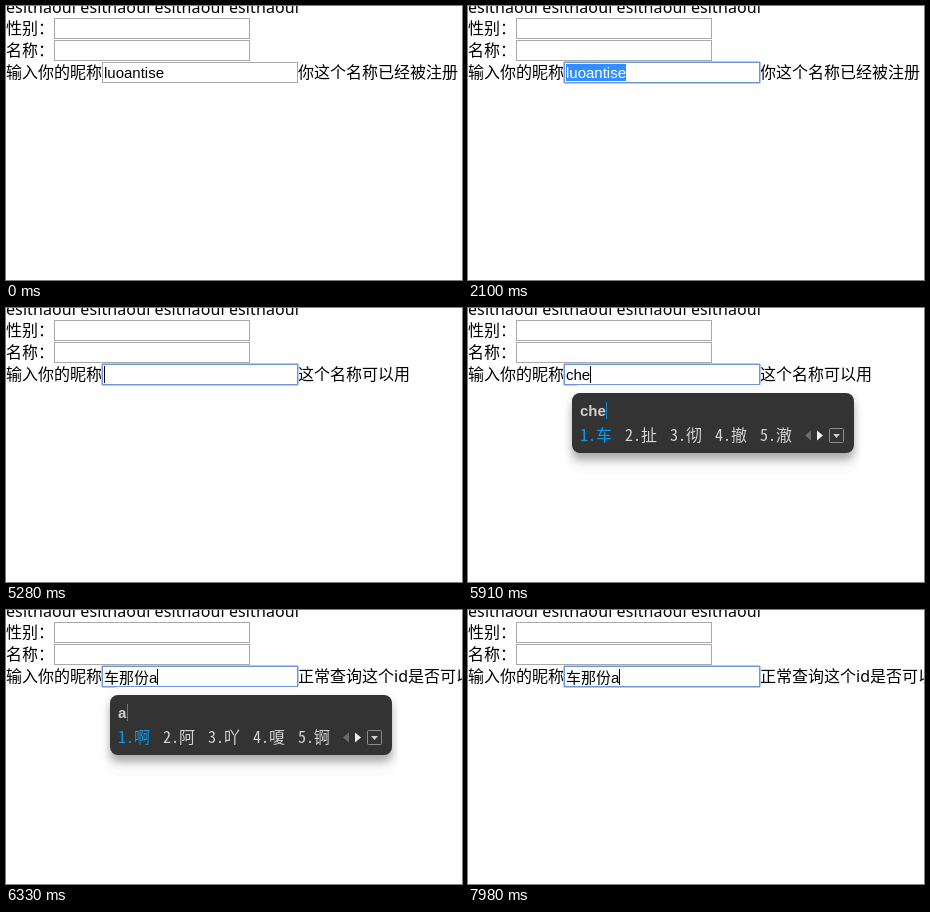
An HTML page for the animation above (8 s loop, 456 by 274 pixels).

```html
<!DOCTYPE html>
<html lang="zh-CN">
<head>
<meta charset="utf-8">
<title>昵称检查</title>
<style>
html, body { margin: 0; width: 100%; height: 100%; overflow: hidden; background: #fff; }
svg { display: block; width: 456px; height: 274px; }
text { white-space: pre; }
.page { font: 16px "Noto Sans", "Noto Sans CJK SC", "Noto Sans CJK", sans-serif; }
.echo { letter-spacing: .1px; }
.field { fill: #fff; stroke: #a9a9a9; }
#ring rect { fill: none; stroke: #b4c9ec; }
#ring rect + rect { stroke: #6f96da; }
#value { font: 15px "Liberation Sans", "Noto Sans CJK SC", "Noto Sans CJK", sans-serif; }
#tail.on { fill: #fff; }
#mark { fill: #338fff; }
#panel { fill: #333; filter: drop-shadow(0 7px 4px rgba(0, 0, 0, .32)); }
#halo { fill: #fcfcfc; }
#pinyin { font: bold 15px "Liberation Sans", sans-serif; fill: #d0d0d0; }
#list { font: 300 16px "Noto Sans Mono CJK SC", "Noto Sans CJK SC", "Noto Sans CJK", sans-serif; fill: #d4d4d4; }
#list .first { fill: #0f9af0; }
#cloud { fill: none; stroke: #a5a5a5; stroke-width: 1.3; }
</style>
</head>
<body>
<svg viewBox="0 0 456 274">
  <g class="page">
    <text class="echo" x="0" y="7">esitnaoul esitnaoul esitnaoul esitnaoul</text>
    <text x="0" y="28">性别：</text>
    <text x="0" y="50">名称：</text>
    <text x="0" y="72">输入你的昵称</text>
    <text id="hint" x="292" y="72"></text>
  </g>
  <g class="field">
    <rect x="48.5" y="12.5" width="195" height="20"/>
    <rect x="48.5" y="34.5" width="195" height="20"/>
    <rect x="96.5" y="56.5" width="195" height="20"/>
  </g>
  <g id="ring">
    <rect x="95.5" y="55.5" width="197" height="22" rx="1.5"/>
    <rect x="96.5" y="56.5" width="195" height="20"/>
  </g>
  <rect id="mark" y="58" height="17"/>
  <text id="value" x="98"><tspan id="head"></tspan><tspan id="tail"></tspan></text>
  <rect id="caret" width="1"/>
  <g id="ime">
    <rect id="halo" x="99" y="77" height="89" rx="14"/>
    <rect id="panel" x="104" y="85" height="60" rx="8"/>
    <text id="pinyin" x="112" y="108"></text>
    <rect id="bar" y="94" width="1" height="17"/>
    <g id="list"></g>
    <path id="cloud" d="M209.500 132.500h9.500a3.500 3.500 0 0 0 .8-6.900a6 5 0 0 0-11.300-.6a3.800 3.800 0 0 0-.5 7.100M211.500 129a3 2.600 0 1 1 3.500 1.200"/>
    <g id="pager">
      <path d="M6 122.500v10l-6-5z" fill="#6c6c6c"/>
      <path d="M12 122.500v10l6-5z" fill="#eee"/>
      <rect x="24.5" y="120.500" width="14" height="14" rx="1" fill="none" stroke="#8c8c8c"/>
      <path d="M28 126h7l-3.500 4z" fill="#ccc"/>
    </g>
  </g>
</svg>
<script>
const LOOP = 8000, LEFT = 98, FADE_AT = 6990, FADE = 150;
const $ = id => document.getElementById(id);
const show = (id, on) => $(id).style.display = on ? '' : 'none';
const set = (id, attrs) => {
  for (const k in attrs) $(id).setAttribute(k, attrs[k]);
};

const TAKEN = '你这个名称已经被注册';
const CHECK = '正常查询这个id是否可以用';
const FREE = '这个名称可以用';

const typed = (value, pinyin, words, xs) =>
  ({ value, caret: true, ime: { pinyin, words: [...words], xs } });
const full = typed('chenaf', "che'na'f", ['车那份', '', '车娜飞', '陈', '车'], [112, 194, 239, 325, 370]);

// Each step changes only the listed parts of the state.
const steps = [
  [0, { value: 'luoantise', hint: TAKEN, focus: false, caret: false, sel: -1, ime: null, bar: '#0d86d0' }],
  [1230, { focus: true, caret: true }],
  [1740, { caret: false }],
  [2070, { sel: 5 }],
  [2100, { sel: 0 }],
  [3240, { value: '', hint: CHECK, sel: -1, caret: true }],
  [3750, { caret: false }],
  [4260, { caret: true }],
  [4770, { caret: false }],
  [5160, { hint: FREE }],
  [5280, { caret: true }],
  [5730, typed('c', 'c', '从才次曾测')],
  [5820, typed('ch', 'ch', '成出吃车处')],
  [5910, typed('che', 'che', '车扯彻撤澈')],
  [6030, typed('chen', 'chen', '陈称沉晨趁')],
  [6120, typed('chena', "che'na", '陈车沉晨趁')],
  [6240, full],
  [6300, { value: '车那份', hint: CHECK, ime: null }],
  [6330, { ...typed('车那份a', 'a', '啊阿吖嗄锕'), bar: '#777' }],
  [6660, { bar: '#0d86d0' }],
  [6840, { caret: false }],
  [6990, { caret: true }],
  [7140, { ime: null }],
  [7500, { caret: false }],
  [7980, { caret: true }]
];

function drawIme({ pinyin, words, xs = words.map((_, i) => 112 + 45 * i) }, bar) {
  const end = xs[xs.length - 1] + 45;
  set('panel', { width: end + 49 - 104 });
  set('halo', { width: end + 54 - 99 });
  set('pager', { transform: `translate(${end})` });
  $('pinyin').textContent = pinyin;
  set('bar', { x: 112 + Math.ceil($('pinyin').getComputedTextLength()), fill: bar });
  $('list').innerHTML = words.map((w, i) => w &&
    `<g class="${i ? '' : 'first'}"><text x="${xs[i]}" y="133">${i + 1}.</text>` +
    `<text x="${xs[i] + 16}" y="133">${w}</text></g>`).join('');
  show('cloud', words.includes(''));
}

function draw(s) {
  const selected = s.sel >= 0;
  const cut = selected ? s.sel : s.value.length;
  const hanzi = /[^a-z]/.test(s.value);
  $('hint').textContent = s.hint;
  $('head').textContent = s.value.slice(0, cut);
  $('tail').textContent = s.value.slice(cut);
  $('tail').setAttribute('class', selected ? 'on' : '');
  set('value', { y: hanzi ? 73 : 72 });

  const width = s.value ? Math.floor($('value').getComputedTextLength()) : 0;
  const from = cut ? Math.round($('head').getComputedTextLength()) : 0;
  set('mark', { x: LEFT + from, width: Math.max(0, width - from) });
  set('caret', { x: LEFT + width, y: hanzi ? 59 : 58, height: hanzi ? 16 : 17 });
  show('mark', selected);
  show('caret', s.caret && !selected);
  show('ring', s.focus);
  show('ime', s.ime);
  if (s.ime) drawIme(s.ime, s.bar);
}

let last = -1;
function tick() {
  const t = performance.now() % LOOP;
  const past = steps.filter(([at]) => at <= t);
  if (past.length !== last) {
    last = past.length;
    draw(Object.assign({}, ...past.map(([, change]) => change)));
  }
  $('ime').style.opacity = Math.min(1, Math.max(0, 1 - (t - FADE_AT) / FADE));
  requestAnimationFrame(tick);
}
tick();
</script>
</body>
</html>
```
